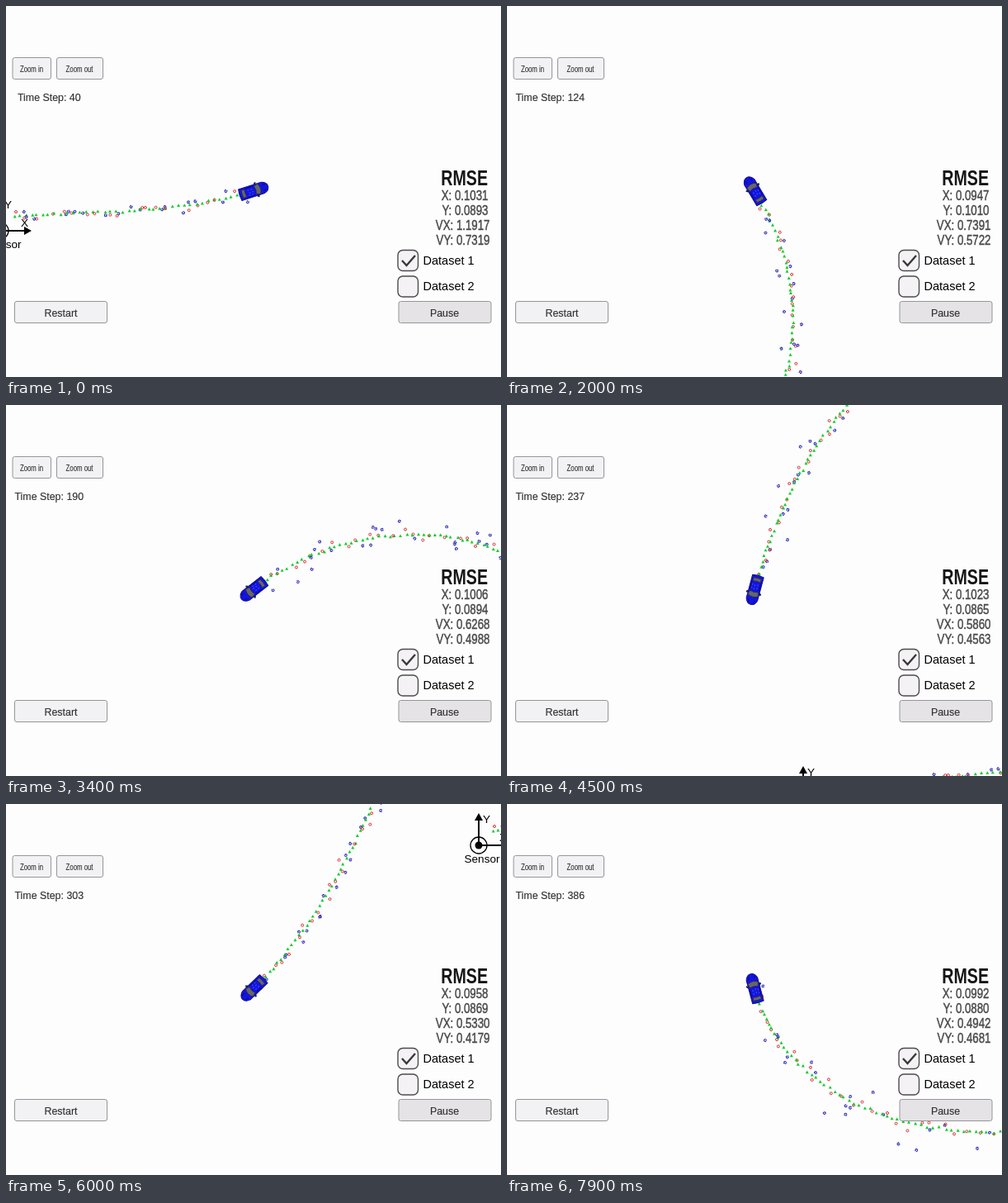
An HTML page that plays this animation: 600 by 449 pixels, repeating every 8000 ms.

```html
<!DOCTYPE html>
<html lang="en">
<head>
<meta charset="utf-8">
<title>Tracking simulator</title>
<style>
  html, body { margin: 0; width: 100%; height: 100%; overflow: hidden; background: #fdfdfe; }
  svg { display: block; width: 100%; height: 100%; font-family: "Liberation Sans", Arial, sans-serif; }
  .button { fill: #f2f1f3; stroke: #969598; }
  .box { fill: #f4f2f5; stroke: #4c4c4c; stroke-width: 1.4; }
  .label { font-size: 12.4px; fill: #323232; stroke: #323232; stroke-width: .15; text-anchor: middle; }
  .small { font-size: 11px; }
  .option { font-size: 14.5px; }
  .value { font-size: 16px; fill: #484848; stroke: #484848; stroke-width: .45; text-anchor: end; }
  .est { fill: #14cc2c; }
  .laser, .radar { fill: none; stroke: #dc2c2c; }
  .radar { stroke: #2424b4; }
</style>
</head>
<body>
<svg viewBox="0 0 600 449" preserveAspectRatio="none">
  <g id="world">
    <g id="markers"></g>
    <g font-size="13.6">
      <circle r="10" fill="none" stroke="#000" stroke-width="1.3"/>
      <circle r="4.5"/>
      <path d="M0 -31V0H31" fill="none" stroke="#000" stroke-width="2"/>
      <path d="M0 -39l5 9h-10zM38 0l-9 5v-10z"/>
      <text x="5" y="-27">Y</text>
      <text x="25" y="-5">X</text>
      <text x="4" y="21" text-anchor="middle">Sensor</text>
    </g>
  </g>

  <g id="car">
    <path d="M5 -9l-2 2M5 9l-2 -2" stroke="#181850" stroke-width="2"/>
    <path d="M-17 -7H12Q18.5 -5 18.5 0T12 7H-17Q-18.5 0 -17 -7Z" fill="#1414e0" stroke="#0e0e88" stroke-linejoin="round"/>
    <path d="M-9 -5.5H1M-9 5.5H1M12 -4l4 1M12 4l4 -1" stroke="#0a0a8c" fill="none"/>
    <path d="M-7 -2.5h7M-6 1h6M-7 4h6" stroke="#3c58ff" stroke-dasharray="2 2"/>
    <path d="M2 -5L7 -6.5Q11 0 7 6.5L2 5Q4 0 2 -5Z" fill="#66666c" stroke="#2a2a48" stroke-width=".8"/>
    <path d="M-10 -4.5L-14 -5Q-15 0 -14 5L-10 4.5Q-11 0 -10 -4.5Z" fill="#66666c" stroke="#2a2a48" stroke-width=".8"/>
  </g>

  <rect class="button" x="8" y="62.5" width="46.5" height="26" rx="2.5"/>
  <rect class="button" x="61.5" y="62.5" width="56" height="26" rx="2.5"/>
  <rect class="button" x="10.5" y="357.5" width="112" height="26" rx="2.5"/>
  <rect class="button" x="476" y="357.5" width="112" height="26" rx="2.5" style="fill:#e5e3e5"/>
  <text class="label small" transform="translate(31 79.5) scale(.71 1)">Zoom in</text>
  <text class="label small" transform="translate(89 79.5) scale(.71 1)">Zoom out</text>
  <text class="label" x="66.5" y="375.5">Restart</text>
  <text class="label" x="531.5" y="375.5">Pause</text>
  <text class="label" id="step" x="52.3" y="115"></text>

  <rect class="box" x="475" y="295.5" width="24.5" height="25" rx="6"/>
  <rect class="box" x="475" y="327" width="24.5" height="25" rx="6"/>
  <path d="M480 308l5.5 6L496 302" fill="none" stroke="#383838" stroke-width="2.4"/>
  <text class="option" x="505.5" y="313">Dataset 1</text>
  <text class="option" x="505.5" y="344">Dataset 2</text>

  <text transform="translate(584 217) scale(.77 1)" font-size="25.5" font-weight="bold" text-anchor="end" fill="#161616">RMSE</text>
  <g id="values"></g>
</svg>
<script>
const $ = id => document.getElementById(id);
const LOOP = 8000, TICK = 100, SPEED = 6.9;

// The drive: position from the sensor (y up) and heading in degrees at a few time steps.
const keys = [
  { tick: -10, step: 0, x: 17, y: 18, dir: 3 },
  { tick: 0, step: 40, x: 307, y: 49, dir: 18, rmse: [.1031, .0893, 1.1917, .7319] },
  { tick: 12, step: 87, x: 532, y: 248, dir: 71, rmse: [.0833, .0951, .8306, .6242] },
  { tick: 20, step: 124, x: 499, y: 486, dir: 121, rmse: [.0947, .1010, .7391, .5722] },
  { tick: 34, step: 190, x: 104, y: 522, dir: 218, rmse: [.1006, .0894, .6268, .4988] },
  { tick: 45, step: 237, x: -59, y: 253, dir: 255, rmse: [.1023, .0865, .5860, .4563] },
  { tick: 60, step: 303, x: -273, y: -173, dir: 224, rmse: [.0958, .0869, .5330, .4179] },
  { tick: 79, step: 386, x: -765, y: -75, dir: 105, rmse: [.0992, .0880, .4942, .4681] }
];

const lerp = (a, b, u) => a + (b - a) * u;
const rad = deg => deg * Math.PI / 180;

// The two keys around a value of the given field, and how far between them it lies.
function between(field, value) {
  let n = 0;
  while (n < keys.length - 2 && keys[n + 1][field] <= value) n++;
  const a = keys[n], b = keys[n + 1];
  return [a, b, (value - a[field]) / (b[field] - a[field])];
}

// Hermite curve whose end slopes follow the headings.
function position(step) {
  const [a, b, u] = between("step", step);
  const pull = SPEED * (b.step - a.step), ease = u * u * (3 - 2 * u);
  const out = pull * u * (1 - u) ** 2, into = -pull * u * u * (1 - u);
  return {
    x: lerp(a.x, b.x, ease) + out * Math.cos(rad(a.dir)) + into * Math.cos(rad(b.dir)),
    y: lerp(a.y, b.y, ease) + out * Math.sin(rad(a.dir)) + into * Math.sin(rad(b.dir))
  };
}

function heading(step) {
  const p = position(step - .5), q = position(step + .5);
  return Math.atan2(q.y - p.y, q.x - p.x) / rad(1);
}

let seed = 41;
function random() {
  seed = (seed * 1664525 + 1013904223) % 4294967296;
  return seed / 4294967296;
}
const noise = sd => (random() + random() + random() + random() - 2) * 1.73 * sd;

function add(parent, tag, attrs) {
  const el = document.createElementNS("http://www.w3.org/2000/svg", tag);
  for (const key in attrs) el.setAttribute(key, attrs[key]);
  return parent.appendChild(el);
}

// Laser and radar take turns; radar scatter grows with its range.
function addMark(step) {
  const { x, y } = position(step), g = add($("markers"), "g", {});
  if (step % 2) {
    const range = Math.hypot(x, y) + noise(7);
    const angle = Math.atan2(y, x) + noise(.026);
    add(g, "path", {
      class: "radar", d: "M1.5 0A1.5 1.5 0 1 1 0 -1.5M0 0L1.7 -1.2",
      transform: `translate(${range * Math.cos(angle)} ${-range * Math.sin(angle)}) rotate(${random() * 360})`
    });
  } else {
    add(g, "circle", { class: "laser", r: 1.5, cx: x + noise(3.6), cy: -y + noise(3.6) });
  }
  add(g, "path", {
    class: "est", d: "M0 -2L2 1.7H-2Z",
    transform: `translate(${x + noise(.8)} ${-y + noise(.8)})`
  });
  return g;
}
const marks = Array.from({ length: keys[keys.length - 1].step }, (_, step) => addMark(step));

const names = ["X", "Y", "VX", "VY"];
const values = names.map((_, i) => add($("values"), "text", {
  class: "value",
  transform: `translate(${i < 2 ? 584.5 : 586.5} ${235 + 17.9 * i}) scale(.83 1)`
}));

function render(tick) {
  const [a, b, u] = between("tick", tick);
  const step = Math.round(lerp(a.step, b.step, u));
  const { x, y } = position(step);

  $("world").setAttribute("transform", `translate(${300 - x} ${223 + y})`);
  $("car").setAttribute("transform", `translate(300 223.5) rotate(${-heading(step)})`);
  marks.forEach((g, i) => g.style.display = i < step - 1 ? "" : "none");
  $("step").textContent = "Time Step: " + step;
  values.forEach((el, i) => el.textContent = `${names[i]}: ${lerp(a.rmse[i], b.rmse[i], u).toFixed(4)}`);
}

const start = performance.now();
let shown = -1;
function frame() {
  const tick = Math.floor((performance.now() - start) % LOOP / TICK);
  if (tick !== shown) render(shown = tick);
  requestAnimationFrame(frame);
}
frame();
</script>
</body>
</html>
```
